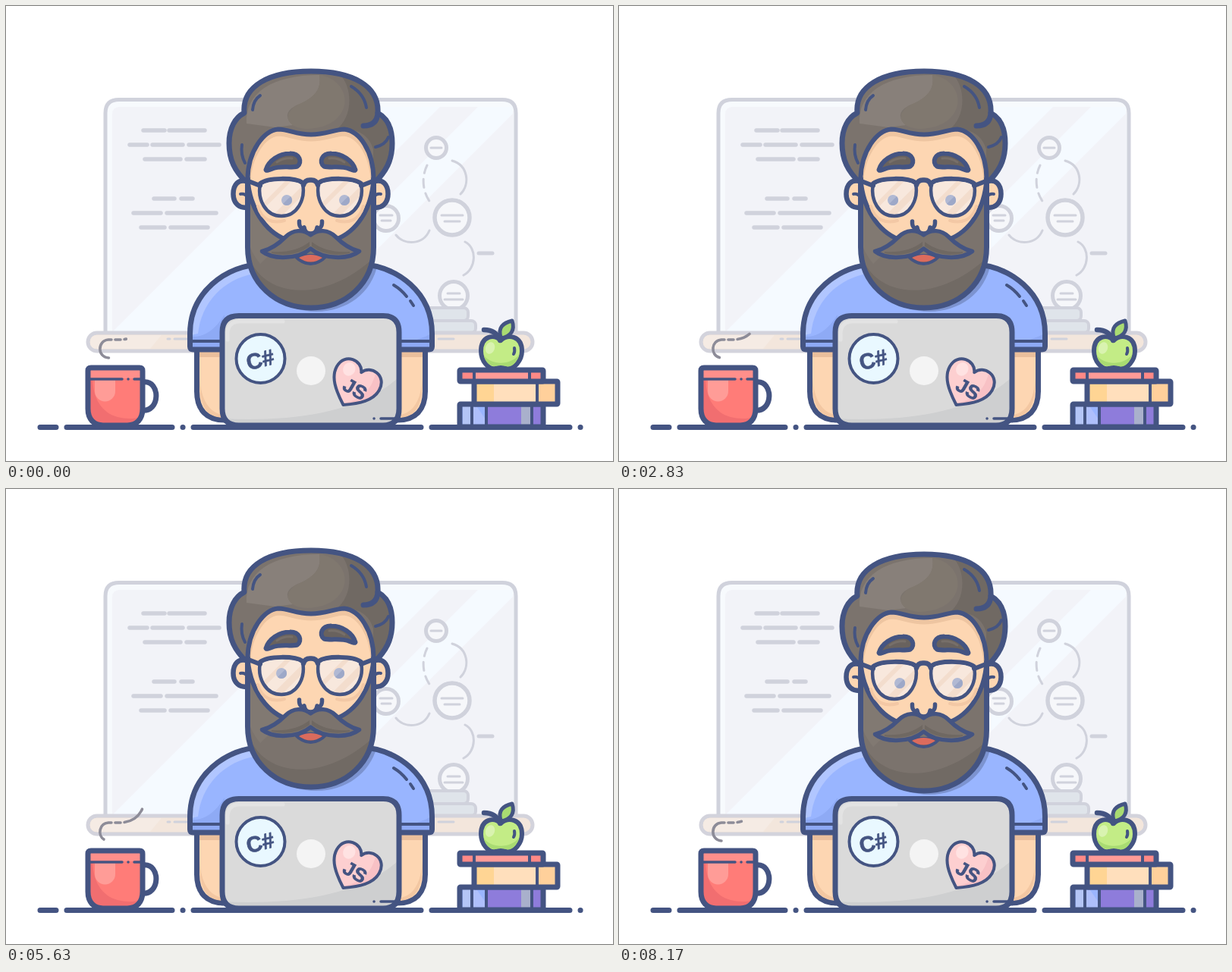
An HTML page for the animation above (8.21 s loop, 800 by 600 pixels).

```html
<!DOCTYPE html>
<html lang="en">
<head>
<meta charset="utf-8">
<title>Bearded developer</title>
<style>
html, body { margin: 0; width: 100%; height: 100%; overflow: hidden; background: #fff; }
svg { display: block; width: 800px; height: 600px; }
text { font: bold 29px "Liberation Sans", Arial, sans-serif; fill: #445482; stroke: #445482; stroke-width: .7px; text-anchor: middle; }
.n { fill: none; }
.plain { stroke: none; }
</style>
</head>
<body>
<svg id="stage" viewBox="0 0 800 600" stroke-linecap="round" stroke-linejoin="round"></svg>
<script>
const LOOP = 8210;
const INK = '#445482', HAIR = '#7b736d', SKIN = '#fdd6b2', CHALK = '#d0d2dc';

const line = (y, ...xs) => {
  let d = '';
  for (let i = 0; i < xs.length; i += 2) d += `M${xs[i]} ${y}H${xs[i + 1]}`;
  return d;
};
const stroke = (d, width = 4, color = INK) =>
  `<path class="n" d="${d}" stroke="${color}" stroke-width="${width}"/>`;
const fill = (d, color, extra = '') => `<path class="plain" d="${d}" fill="${color}" ${extra}/>`;
const shape = (d, color, width = 7) =>
  `<path d="${d}" fill="${color}" stroke="${INK}" stroke-width="${width}"/>`;
const clip = (id, d) => `<clipPath id="${id}"><path d="${d}"/></clipPath>`;
const clipped = (id, inner) => `<g clip-path="url(#${id})">${inner}</g>`;
const mirror = inner => `<g transform="translate(803 0) scale(-1 1)">${inner}</g>`;
const both = inner => inner + mirror(inner);

// Diagonal glare between the lines x + y = a and x + y = b
const glare = (a, b) =>
  fill(`M${a - 133} 133H${b - 133}L${b - 430} 430H${a - 430}Z`, '#f5faff');

const node = (x, y, r, width, ...marks) =>
  `<circle cx="${x}" cy="${y}" r="${r}" fill="#f6f7fa" stroke="${CHALK}" stroke-width="${width}"/>` +
  marks.map(([dy, half]) => stroke(line(y + dy, x - half, x + half), 3, CHALK)).join('');

function board() {
  const outer = 'M131 432V141Q131 123.500 149 123.500H654Q672 123.500 672 141V432Z';
  const notes = line(164, 181, 209, 215, 262) + line(183, 163, 186, 193, 233, 241, 281) +
    line(202, 183, 230, 238, 262) + line(254, 195, 222, 231, 246) +
    line(273, 168, 204, 212, 277) + line(292, 178, 209, 217, 266);
  return clip('inner', 'M140 133H668V432H140Z') +
    fill(outer, '#f7fafd') + fill('M140 432V143Q140 133 150 133H660Q669 133 669 143V432Z', '#f2f3f8') +
    clipped('inner', glare(570, 705) + glare(755, 810)) +
    stroke(outer, 5, CHALK) + stroke(notes, 5.5, CHALK) +
    stroke('M588 204C609 210 612 235 599 248M514 302C525 316 550 315 558 296M605 311C621 319 620 346 603 355', 3, CHALK) +
    `<path class="n" d="M555 210C547 226 549 246 560 260" stroke="${CHALK}" stroke-width="3" stroke-dasharray="11 8"/>` +
    stroke(line(326, 623, 641), 5, CHALK) +
    node(567, 187, 13.5, 5, [0, 7]) + node(588, 279, 23, 5.5, [-3, 14], [5, 10]) +
    node(501, 280, 16.5, 5, [-4, 8], [3, 6]) + node(590, 382, 18.5, 5, [-3, 8], [5, 12]) +
    `<g fill="#dfe4ea" stroke="${CHALK}" stroke-width="4">
      <rect x="530" y="398" width="79" height="17" rx="6"/><rect x="530" y="415" width="89" height="16" rx="6"/></g>` +
    `<rect x="108" y="431" width="586" height="24" rx="12" fill="#f3e6dc" stroke="#d3d3dc" stroke-width="5"/>` +
    fill('M111 443Q111 434 121 434H205L190 452H120Q111 452 111 443Z', '#f5ebe4') +
    stroke(line(439, 213, 216, 222, 238, 570, 590), 3, CHALK);
}

function mug() {
  const body = 'M108 481Q108 477 112 477H176Q180 477 180 481V531C180 545 172 553 160 553H128C116 553 108 545 108 531Z';
  return clip('mug', body) + stroke('M181 496C204 493 204 537 178 533', 7) + fill(body, '#ff7c78') +
    clipped('mug',
      fill('M104 474H184V491H104Z', '#ff8f8b') +
      fill('M106 492V556H184V541C150 550 116 540 114 492Z', '#f16e70') +
      fill('M117 493H144V508A13.500 13.500 0 0 1 117 508Z', '#ff9c97')) +
    stroke(body, 7) + stroke(line(492, 109, 153, 161, 161.1, 169, 179), 3.5);
}

const block = (x, y, w, h, color) => `<rect class="plain" x="${x}" y="${y}" width="${w}" height="${h}" fill="${color}"/>`;
const cover = (x, y, w, h) =>
  `<rect class="n" x="${x}" y="${y}" width="${w}" height="${h}" rx="1" stroke="${INK}" stroke-width="7"/>`;

function books() {
  return block(599, 525, 110, 30, '#8e7cdb') + block(599, 525, 34, 30, '#9ab5ff') +
    block(602, 528, 10, 27, '#b4c5f6') + fill('M616 529H621L632 545V553H616Z', '#aebffb') +
    block(679, 525, 13, 30, '#a9b0cc') +
    stroke('M614 528V553M633 528V553M693 528V553', 4) + cover(598, 525, 110, 30) +
    block(617, 495, 110, 30, '#ffdfbc') + block(620, 498, 23, 25, '#ffd594') + block(701, 498, 24, 25, '#ffd09b') +
    stroke('M700 498V522', 4) + cover(617, 495, 110, 30) +
    block(598, 480, 110, 15, '#ff8986') + block(619, 483, 70, 9, '#ff9b97') +
    stroke('M617 483V492M690 483V492', 4) + cover(598, 480, 110, 15);
}

function fruit() {
  const body = 'M652 441C643 432 626 435 626 455C626 468 636 480 645 478Q652 476 659 478C670 480 680 467 680 455C680 435 662 432 652 441Z';
  return shape(body, '#c3ec86', 6) +
    fill('M630 461C640 474 665 474 676 460C673 472 665 477 659 475Q652 473 645 475C638 475 631 469 630 461Z', '#a9db72') +
    `<ellipse class="plain" cx="638" cy="451" rx="6" ry="8" fill="#d9f3b0" transform="rotate(20 638 451)"/>` +
    stroke('M670 451Q671 456 669 459', 4) +
    shape('M652 437C648 424 655 418 667 415C671 427 666 436 652 438Z', '#a9db72', 5) +
    stroke('M630 427Q646 427 651 441', 6.5);
}

const BEARD = 'M318.500 228V318C318.500 366 356 398 402 398C448 398 484.500 366 484.500 318V228';

function torso() {
  const shirt = 'M242.500 449V432C242.500 379 287 342 341 340H463C518 342 561.500 379 561.500 432V449Q561.500 453 557 453H247Q242.500 453 242.500 449Z';
  return clip('shirt', shirt) +
    shape('M251.500 452V508C251.500 532 264 546 288 546H516C540 546 552.500 532 552.500 508V452Z', SKIN) +
    fill('M255 456H285V463H255ZM520 456H549V463H520Z', '#eabf9c') +
    fill('M255 490C257 520 268 536 285 539V543C262 541 255 526 255 490ZM549 490C547 520 537 536 520 539V543C541 541 549 526 549 490Z', '#f3c7a2') +
    fill(shirt, '#99b5ff') +
    clipped('shirt',
      fill('M240 435C246 371 297 337 350 340L335 352C291 356 258 388 253 432Z', '#b1c6ff') +
      fill('M240 455V435C258 440 276 427 288 407V455ZM515 445Q545 442 564 430V455H515Z', '#8eaaf5')) +
    clipped('shirt', `<path id="shade" class="plain" d="${BEARD}" fill="#7c93d0"/>`) +
    stroke(shirt, 7) + stroke(line(442, 245, 284, 520, 559), 4) +
    stroke('M511 368Q521 374 528 383M533 389L537 395', 4);
}

function hairAndFace() {
  const hair = 'M318 234C301 217 294 203 294 181C294 161 302 147 314 141C311 106 346 86 402 86C458 86 492 106 490 141C503 148 509 162 509 181C509 204 501 218 485 234Z';
  const hairline = 'M318.500 228C319 191 340 164 359 162.500C374 163 382 169.500 402 169.500C421 169.500 432 163 446 162.500C466 165 484 191 484.500 228';
  const skin = hairline + 'C482 268 462 298 434 308H369C341 297 321 266 318.500 228Z';
  return clip('hair', hair) + clip('skin', skin) + clip('beard', BEARD) + fill(hair, HAIR) +
    clipped('hair',
      fill('M317 155C315 115 350 91 413 91C417 113 402 123 385 130C366 138 369 149 378 157L355 160Z', '#88807a') +
      fill('M413 91C459 98 461 159 398 162C370 162 362 142 385 130C402 123 417 112 413 91Z', '#80786f') +
      fill('M440 90C487 97 495 128 486 146Q501 140 510 171Q507 210 484 236V189C478 168 460 159 434 164C457 148 458 109 440 90Z', '#706963')) +
    stroke(hair, 7) +
    both(shape('M319 232C306 227 299.500 236 299.500 248C299.500 260 308 268 319 265', SKIN, 6.5) +
      stroke('M309 248Q315 247 318 252', 4)) +
    fill(BEARD, HAIR) +
    clipped('beard', fill('M318 320C326 377 407 403 486 331V400H318Z', '#716a64') +
      fill('M319 243C330 280 344 301 366 310L335 340Q323 325 319 310Z', '#817972')) +
    fill(skin, SKIN) +
    clipped('skin', `<g transform="translate(0 5)">${stroke(hairline, 8, '#eec5a1')}</g>`) +
    stroke(skin, 6) + stroke(BEARD, 7) +
    stroke('M335 118Q326 124 325 137M455 106Q472 116 475 134M311 183Q309 196 315 207M504 173Q500 183 487 186') +
    stroke('M490 141Q489 158 471 158', 7);
}

function glasses() {
  const lens = 'M335 235C344 226 382 226 391 234C395 255 384 277 363 277C342 277 331 255 335 235Z';
  const half = fill(lens, '#f8e8dd');
  const glint = x => clipped('lens',
    `<g transform="translate(${x} 0)">${stroke('M335 268L377 226', 6, '#f2d9c6aa') + stroke('M350 284L400 234', 9, '#f2d9c6aa')}</g>`);
  const rim = stroke(lens, 4.5) + stroke('M317 230L335 237M335 234C345 226 381 226 391 233', 6);
  const pupil = x => `<circle class="plain" cx="${x}" cy="256" r="7" fill="#b1b9d3"/>` +
    fill(`M${x + 5} 251A7 7 0 0 1 ${x - 5} 261Z`, '#9da8c8');
  return clip('lens', lens) + both(stroke('M332 264C337 283 352 287 367 283', 4, '#f3c8a5') + half) +
    glint(0) + `<g transform="translate(77 0)">${glint(0)}</g>` +
    `<g id="pupils">${pupil(361)}${pupil(437)}</g>` + both(rim) +
    stroke('M392 236Q394 229 401.500 229.500Q409 229 411 236', 6.5);
}

function face() {
  const brow = shape('M342.500 216C346 204 360 194.500 374 194.500C387 194 391 206 384 211.500C374 214 362 210 350 215Q343 218 342.500 216Z', '#69625e', 6) +
    stroke('M357 206Q366 200 377 201', 3, '#776f69');
  const tash = 'M401.500 302C392 294 378 295 369 304C359 314 349 321 337.500 323.500C352 335 385 334 401.500 320C418 334 451 335 465.500 323.500C454 321 444 314 434 304C425 295 411 294 401.500 302Z';
  return `<g id="browL">${brow}</g><g id="browR">${mirror(brow)}</g>` + glasses() +
    shape('M380 329Q401.500 351 423 329Z', '#59505a', 4) + fill('M386 332Q401.500 324 417 332Q401.500 343 386 332Z', '#db6b5d') +
    `<g id="tash">${shape(tash, HAIR, 5.5)}${fill('M350 324Q381 326 400 311V317Q380 332 350 326ZM453 324Q422 326 403 311V317Q423 332 453 326Z', '#6f6862')}</g>` +
    fill('M386.500 280V288L393 292Q394 300 401.500 300Q409 300 410 292L416.500 288V280Z', SKIN) +
    stroke('M386.500 284C386 293 391 294 393 292Q394 300 401.500 300Q409 300 410 292C412 294 417 293 416.500 284', 5.5);
}

function laptop() {
  const lid = 'M307 408.500H497Q518 408.500 518 430V531Q518 553 497 553H307Q285 553 285 531V430Q285 408.500 307 408.500Z';
  const heart = 'M0 0C-18 -12 -32 -24 -32 -40C-32 -62 -6 -64 0 -49C6 -64 32 -62 32 -40C32 -24 18 -12 0 0Z';
  return clip('lid', lid) + clip('heart', heart) + fill(lid, '#dadada') +
    clipped('lid', fill('M285 544C380 549 472 535 520 487V556H285Z', '#cecfd0') +
      stroke('M292 440V433Q292 416 308 416H365', 5, '#e3e3e3')) + stroke(lid, 7) +
    `<circle class="plain" cx="402" cy="481" r="19" fill="#f4f4f4"/>` +
    `<circle cx="335.500" cy="465" r="32" fill="#e9f8ff" stroke="${INK}" stroke-width="4"/>
    <text transform="translate(337.500 476) rotate(-14)">C#</text>
    <g transform="translate(444.500 526) rotate(29)">${fill(heart, '#fdcfd0')}` +
    clipped('heart', fill('M-5 2C18 -18 24 -32 16 -62H40V2Z', '#f8c1c5') +
      `<ellipse class="plain" cx="-16" cy="-45" rx="8" ry="9" fill="#ffe2e2"/>`) +
    `${stroke(heart, 4)}</g>
    <text transform="translate(455.500 513) rotate(30)" style="font-size:26px">JS</text>` +
    stroke(line(544, 485, 485.1, 494, 516), 3.5);
}

const STEAM = 'M136 464C120 464 120 441 135 440H150C163 440 173 434 178 425C189 406 178 381 155 380C132 380 122 407 135 418C143 424 162 424 162 411Q162 401 151 400';

const stage = document.getElementById('stage');
stage.innerHTML = board() + stroke(line(555.5, 45, 66, 80, 219, 233, 233.1, 247, 547, 561, 743, 757, 757.1), 7) +
  `<path id="steam" class="n" d="${STEAM}" stroke="#8d8c98" stroke-width="3.600"/>` +
  mug() + books() + fruit() + torso() +
  `<g id="head">${hairAndFace()}<g id="face">${face()}</g></g>` + laptop();

const part = id => document.getElementById(id);
const move = (id, x, y) => part(id).setAttribute('transform', `translate(${x} ${y})`);
const clamp = x => Math.max(0, Math.min(1, x));
const ramp = (t, a, b) => { const x = clamp((t - a) / (b - a)); return x * x * (3 - 2 * x); };
const inOut = x => { x = clamp(x); return x < .5 ? 2 * x * x : 1 - 2 * (1 - x) ** 2; };

const steam = part('steam');
const steamLength = steam.getTotalLength();
const inkedSpans = [[0, 41], [46, 53], [58, steamLength]];

// Each wisp lasts longer than the gap between wisps, so two may show at once.
function steamSpans(t) {
  const spans = [];
  for (let start = -950; start < t; start += 2715) {
    const age = t - start;
    const head = inOut(age / 2750) * steamLength;
    const tail = inOut((age - 880) / 2250) * steamLength;
    for (const [a, b] of inkedSpans) {
      const from = Math.max(a, tail), to = Math.min(b, head);
      if (to > from) spans.push([from, to]);
    }
  }
  return spans.sort((p, q) => p[0] - q[0]);
}

function drawSteam(t) {
  const spans = steamSpans(t);
  steam.setAttribute('visibility', spans.length ? 'visible' : 'hidden');
  if (!spans.length) return;
  const dashes = spans.flatMap(([from, to], i) => {
    const next = i + 1 < spans.length ? spans[i + 1][0] : to + 2 * steamLength;
    return [to - from, Math.max(0, next - to)];
  });
  steam.setAttribute('stroke-dasharray', dashes.join(' '));
  steam.setAttribute('stroke-dashoffset', -spans[0][0]);
}

function draw(t) {
  const back = ramp(t, 7270, 7830);
  const raised = ramp(t, 4650, 5250) - back;
  const aside = 1 - ramp(t, 600, 950) + back;
  const nudge = ramp(t, 4500, 4850) - back;
  move('head', 0, -5 * raised);
  move('shade', 7, 5 - 5 * raised);
  move('face', 0, -raised);
  move('browR', 0, -8 * raised);
  move('pupils', 9 * aside + 2 * nudge, -7 * raised);

  const twitch = ramp(t, 950, 1200) - ramp(t, 1950, 2200);
  part('tash').setAttribute('transform', `rotate(${-2.5 * twitch * Math.abs(Math.sin(t / 190))} 402 315)`);
  drawSteam(t);
}

const began = performance.now();
function tick() {
  draw((performance.now() - began) % LOOP);
  requestAnimationFrame(tick);
}
tick();
</script>
</body>
</html>
```
